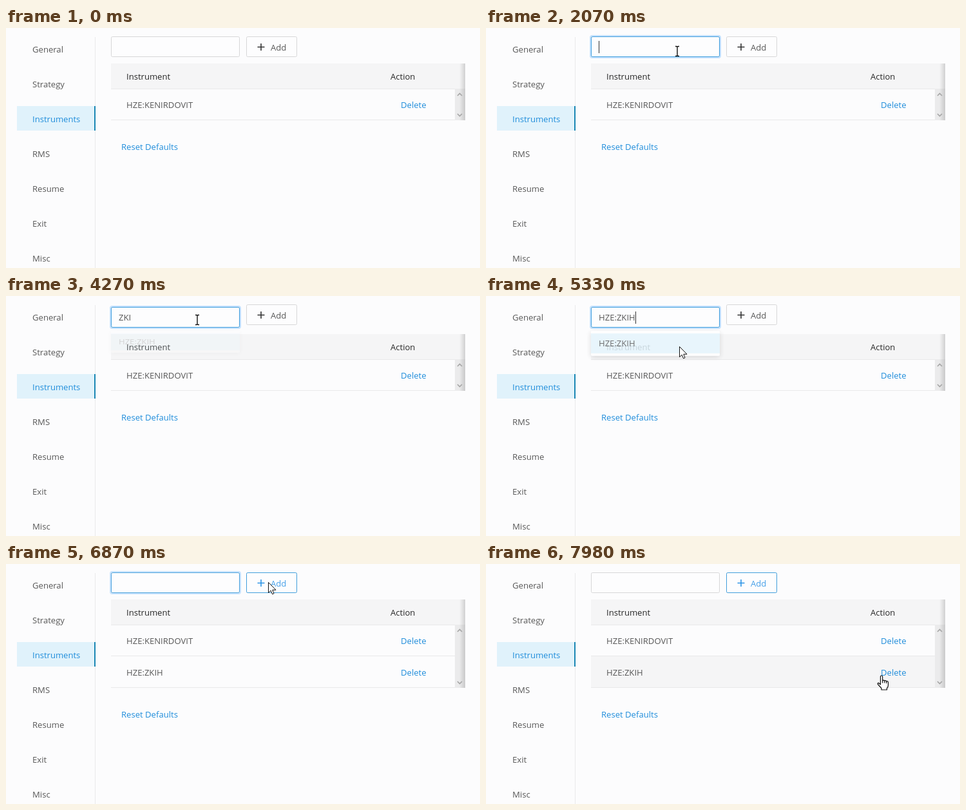
Animation, 736 px wide and 372 px high, one loop 8000 ms. Source, as an HTML page:

```html
<!DOCTYPE html>
<html lang="en">
<head>
<meta charset="utf-8">
<title>Instrument settings</title>
<style>
  html, body { margin: 0; width: 100%; height: 100%; overflow: hidden; background: #fcfcfd; }
  svg { display: block; }
  text { font: 13.1px "Open Sans", "Noto Sans", sans-serif; fill: #585858; white-space: pre; }
  .head { fill: #272727; }
  .link { fill: #1f8ddb; }
  .line { stroke: #e9e9ea; }
  .box { fill: #fdfdfe; stroke: #d7d7d8; }
  .blue { fill: none; stroke: #429fdc; }
  .chevron { fill: none; stroke: #a6a6a6; stroke-width: 1.6; }
  .cursor { fill: #fff; stroke: #111; stroke-linejoin: round; }
</style>
</head>
<body>
<svg width="736" height="372">
  <defs>
    <linearGradient id="edge">
      <stop offset="0" stop-color="#000" stop-opacity="0"/>
      <stop offset="1" stop-color="#000" stop-opacity=".15"/>
    </linearGradient>
    <filter id="shadow" x="-10%" y="-50%" width="120%" height="220%">
      <feDropShadow dx="0" dy="2" stdDeviation="4" flood-opacity=".15"/>
    </filter>
    <path id="plus" stroke-width="1.6" d="M390.5 29.5H401.5M396 24V35"/>
  </defs>

  <path class="line" d="M138.5 14V372"/>
  <rect x="17" y="121" width="121" height="38" fill="#e0f2fb"/>
  <rect x="137" y="121" width="2" height="38" fill="#1a87b4"/>
  <g id="menu"></g>

  <g id="form">
    <rect x="163" y="55" width="550" height="39" fill="#f5f5f6"/>
    <text class="head" x="187" y="80">Instrument</text>
    <text class="head" x="597" y="80">Action</text>
    <path class="line" d="M163 94.5H697"/>

    <text x="187" y="124">HZE:KENIRDOVIT</text>
    <text class="link" x="613" y="124">Delete</text>
    <path class="line" d="M163 142.5H697"/>
    <g id="newRow">
      <rect id="rowHover" x="163" y="143" width="534" height="48" fill="#f5f5f6"/>
      <text x="187" y="173">HZE:ZKIH</text>
      <text class="link" x="613" y="173">Delete</text>
      <path class="line" d="M163 191.5H697"/>
    </g>

    <rect id="track" x="697" y="94" width="16" fill="#ebebec"/>
    <rect id="trackEdge" x="704" y="55" width="9" fill="url(#edge)"/>
    <path class="chevron" d="M701 105l3.5-3.5 3.5 3.5"/>
    <path class="chevron" id="down" d="M701 133l3.5 3.5 3.5-3.5"/>
    <text class="link" id="reset" x="179" y="189">Reset Defaults</text>

    <rect id="glow" x="162" y="12" width="202" height="34" rx="3" fill="none" stroke="#1890ff" stroke-opacity=".25" stroke-width="2"/>
    <rect class="box" x="163.5" y="13.5" width="199" height="31" rx="2"/>
    <rect class="blue" id="inputBlue" x="163.5" y="13.5" width="199" height="31" rx="2"/>
    <text id="typed" x="175" y="34"></text>
    <path id="caret" stroke="#333" d="M.5 20V39"/>
  </g>

  <g>
    <rect class="box" x="373.5" y="13.5" width="78" height="31" rx="2"/>
    <use href="#plus" stroke="#333"/>
    <text x="411" y="35">Add</text>
  </g>
  <g id="addBlue">
    <rect class="blue" x="373.5" y="13.5" width="78" height="31" rx="2" style="fill:#fdfdfe"/>
    <use href="#plus" stroke="#2b94e6"/>
    <text x="411" y="35" style="fill:#459fe8">Add</text>
  </g>

  <g id="list">
    <rect width="200" height="40" rx="2" fill="#fff" filter="url(#shadow)"/>
    <rect y="4" width="200" height="32" fill="#e6f6fe"/>
    <text x="12" y="25">HZE:ZKIH</text>
  </g>

  <path class="cursor" id="arrow" d="M.5 .5V16.5L4.2 13.2 6.6 18.8 9 17.7 6.8 12.2H12Z"/>
  <path class="cursor" id="beam" style="fill:none" stroke-width="1.4" d="M-3-7.5H-1.2Q0-7.5 0-6.5 0-7.5 1.2-7.5H3M0-6.5V6.5M-3 7.5H-1.2Q0 7.5 0 6.5 0 7.5 1.2 7.5H3"/>
  <path class="cursor" id="hand" stroke-width="1.2" d="M-1.5 1.5Q-1.5 0 0 0T1.7 1.5V8Q3 6.3 4.8 8 6.3 6.8 7.7 8.8 10.5 8 10.5 11V15Q10.5 18 8.5 19.5V22H0V19.5L-5.5 13.5Q-6.5 11.5-4.5 11.3L-1.5 13.8ZM1.7 8V11.5M4.8 8.3V11.5M7.7 9V12"/>
</svg>
<script>
const LOOP = 8000, FOCUS = 1690, OPEN = 4262, SELECT = 5300, ADD = 6700, BLUR = 6850;
const KEYS = [[2840, "Z"], [3070, "ZK"], [3730, "ZKI"], [SELECT, "HZE:ZKIH"], [ADD, ""]];
// time, x, y of the pointer
const PATH = [
  [620, 610, 373], [1220, 294, 47], [1420, 297, 36], [3420, 297, 36], [3560, 297, 37],
  [4290, 297, 37], [5000, 300, 78], [SELECT, 300, 78], [6000, 307, 66], [6650, 407, 28],
  [6900, 407, 28], [7530, 600, 160], [7760, 616, 175], [7980, 614, 173]
];

const $ = id => document.getElementById(id);
const set = (id, name, value) => $(id).setAttribute(name, value);
const opacity = (id, value) => set(id, "opacity", +value);
const move = (id, x, y) => set(id, "transform", `translate(${x} ${y})`);
const ramp = (t, start, length) => Math.min(1, Math.max(0, (t - start) / length));
const smooth = u => u * u * (3 - 2 * u);
const quint = u => 1 - (1 - u) ** 5;

["General", "Strategy", "Instruments", "RMS", "Resume", "Exit", "Misc"].forEach((label, i) => {
  const item = document.createElementNS("http://www.w3.org/2000/svg", "text");
  item.textContent = label;
  item.setAttribute("x", 41);
  item.setAttribute("y", 38 + 54 * i);
  if (i === 2) item.setAttribute("class", "link");
  $("menu").append(item);
});

function pointer(t) {
  let [x, y] = PATH[0].slice(1);
  for (let i = 1; i < PATH.length; i++) {
    const [t0, x0, y0] = PATH[i - 1], [t1, x1, y1] = PATH[i];
    if (t < t0) break;
    const u = smooth(ramp(t, t0, t1 - t0));
    x = x0 + (x1 - x0) * u;
    y = y0 + (y1 - y0) * u;
  }
  return [Math.round(x), Math.round(y)];
}

function draw(t) {
  const shift = t >= KEYS[0][0] && t < ADD ? 4 : 0;
  const extra = t >= ADD ? 49 : 0;
  const last = KEYS.filter(k => k[0] <= t).pop() || [FOCUS, ""];

  move("form", 0, shift);
  opacity("newRow", extra > 0);
  opacity("rowHover", ramp(t, 7450, 300));
  set("track", "height", 49 + extra);
  set("trackEdge", "height", 88 + extra);
  move("down", 0, extra);
  move("reset", 0, extra);

  const blur = ramp(t, BLUR, 300);
  opacity("glow", ramp(t, FOCUS, 300) * (1 - blur));
  opacity("inputBlue", ramp(t, 1240, 300) * (1 - blur));
  opacity("addBlue", ramp(t, 6520, 300));

  $("typed").textContent = last[1];
  const width = last[1] ? $("typed").getComputedTextLength() : 0;
  const lit = Math.floor((t - last[0]) / 530) % 2 === 0;
  opacity("caret", t >= FOCUS && t < ADD && lit);
  move("caret", Math.round(175 + width), 0);

  const shown = quint(ramp(t, OPEN, 200)) * (1 - ramp(t, SELECT, 200));
  opacity("list", shown);
  set("list", "transform", `translate(163 54) scale(1 ${0.8 + 0.2 * shown})`);

  const [x, y] = pointer(t);
  const inInput = x > 163 && x < 363 && y > 13 + shift && y < 45 + shift;
  const onLink = t > OPEN && t < SELECT && y > 54 || x >= 613 && y > 157 && t > ADD;
  const kind = inInput ? "beam" : onLink ? "hand" : "arrow";
  for (const id of ["arrow", "beam", "hand"]) {
    opacity(id, t >= 620 && id === kind);
    move(id, x, y);
  }
}

const start = performance.now();
function tick() {
  draw((performance.now() - start) % LOOP);
  requestAnimationFrame(tick);
}
tick();
</script>
</body>
</html>
```
